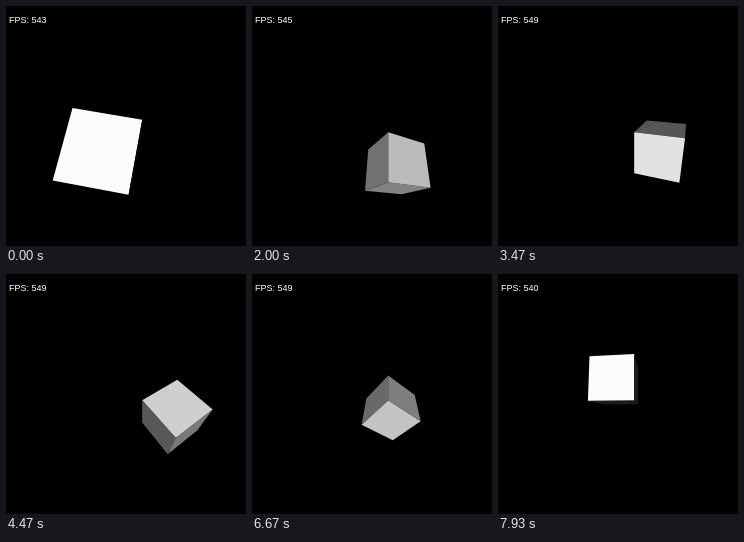
An HTML page with a canvas that plays this animation: 240 by 240 pixels, repeating every 8000 ms.

```html
<!DOCTYPE html>
<html lang="en">
<head>
<meta charset="utf-8">
<title>Rotating cube</title>
<style>
  html, body { margin: 0; width: 100%; height: 100%; overflow: hidden; background: #000; }
  canvas { display: block; width: 240px; height: 240px; }
</style>
</head>
<body>
<canvas id="stage" width="240" height="240"></canvas>
<script>
const ctx = document.getElementById('stage').getContext('2d');
const LOOP = 8000, STEP = 200 / 3;
const PIVOT = { x: 136.2, y: 126.3 };
const EYE = 3, FOCAL = 144.8;
const START_ANGLE = -10, SPEED = 34.5; // degrees, degrees per second
const READINGS = [[0, 543], [500, 551], [1500, 545], [2600, 549], [7870, 540]];

const add = (...vs) => [0, 1, 2].map(i => vs.reduce((sum, v) => sum + v[i], 0));
const scale = (v, k) => v.map(n => n * k);
const dot = (a, b) => a[0] * b[0] + a[1] * b[1] + a[2] * b[2];

// The three cube edges leaving the fixed corner: y points down, z away from the viewer.
function cubeEdges(angle) {
  const c = Math.cos(angle), s = Math.sin(angle);
  return [
    [0, s, -c],
    [-c, s * c, s * s],
    [s, c * c, c * s]
  ];
}

function project([x, y, z]) {
  const k = FOCAL / (EYE + z);
  return [PIVOT.x + x * k, PIVOT.y + y * k];
}

function drawFace(origin, normal, b, c) {
  if (dot(normal, add(origin, [0, 0, EYE])) >= 0) return;
  const light = Math.round(255 * Math.max(0, -normal[2]));
  ctx.fillStyle = `rgb(${light}, ${light}, ${light})`;
  ctx.beginPath();
  for (const p of [origin, add(origin, b), add(origin, b, c), add(origin, c)]) {
    ctx.lineTo(...project(p));
  }
  ctx.fill();
}

function draw(ms) {
  const time = Math.floor((ms + 3.4) / STEP) * STEP;
  const edges = cubeEdges((START_ANGLE + SPEED * time / 1000) * Math.PI / 180);
  ctx.fillStyle = '#000';
  ctx.fillRect(0, 0, 240, 240);
  edges.forEach((a, i) => {
    const b = edges[(i + 1) % 3], c = edges[(i + 2) % 3];
    drawFace([0, 0, 0], scale(a, -1), b, c);
    drawFace(a, a, b, c);
  });
  const fps = READINGS.filter(([from]) => from <= ms).pop()[1];
  ctx.font = '9px "Liberation Sans", Arial, sans-serif';
  ctx.fillStyle = '#fff';
  ctx.fillText(`FPS: ${fps}`, 3, 17);
}

const began = performance.now();
function tick() {
  draw((performance.now() - began) % LOOP);
  requestAnimationFrame(tick);
}
tick();
</script>
</body>
</html>
```
